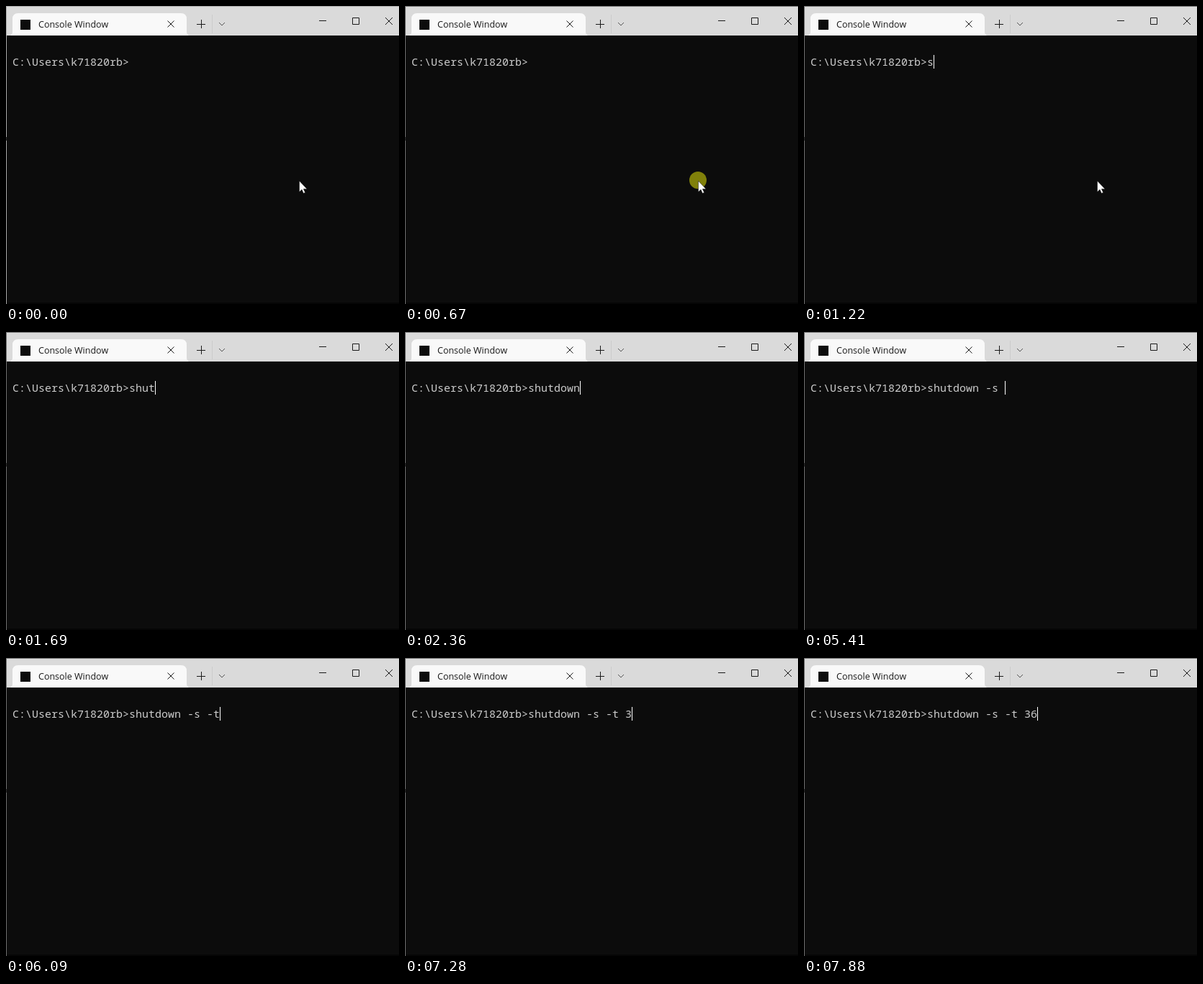
Write an HTML page that moves like this. It is 546 px wide and 414 px high and loops after 8 s.

```html
<!DOCTYPE html>
<html lang="en">
<head>
<meta charset="utf-8">
<title>Terminal typing</title>
<style>
  html, body { margin: 0; width: 100%; height: 100%; overflow: hidden; background: #0c0c0c; }
  svg { display: block; width: 546px; height: 414px; }
  .title { font: 500 12.5px "Open Sans", "Noto Sans", sans-serif; fill: #1a1a1a; }
  .term { font: 500 15px "Noto Sans Mono", "DejaVu Sans Mono", monospace; fill: #ccc; white-space: pre; font-variant-ligatures: none; }
  .line { fill: none; stroke: #1a1a1a; stroke-width: 1; }
</style>
</head>
<body>
<svg viewBox="0 0 546 414">
  <rect width="546" height="414" fill="#0c0c0c"/>
  <rect y="412" width="546" height="2" fill="#060606"/>
  <rect width="546" height="41" fill="#dadada"/>
  <path d="M4 41Q9 41 9 36V18Q9 10 17 10H243Q251 10 251 18V36Q251 41 256 41Z" fill="#f9f9f9"/>
  <rect x="20" y="19" width="14" height="14" fill="#0c0c0c"/>
  <text class="title" x="45" y="30">Console Window</text>

  <path class="line" d="M224.5 20.5l9 9m0-9l-9 9"/>
  <path class="line" d="M265 25.5h12M271.5 19v12"/>
  <path d="M286.5 12v26" stroke="#cbcbcb"/>
  <path class="line" d="M296 23l4 4 4-4" style="stroke:#555"/>
  <path class="line" d="M435 20.5h10M481.5 16.5h9v9h-9zM527 16l10 10m0-10l-10 10"/>

  <path id="edge" d="M0 .5H546M.5 0V414" fill="none"/>
  <rect y="182" width="1" height="5" fill="#2a2a2a"/>

  <text class="term" x="9" y="83" xml:space="preserve">C:\Users\k71820rb&gt;<tspan id="typed"></tspan></text>
  <rect id="caret" y="68" width="1" height="19" fill="#fff"/>
  <circle id="click" cx="407" cy="242" r="12" fill="#80800a"/>
  <path id="mouse" d="M407.5 243v15.3l3.5-3.3 2.3 5.2 2.4-1-2.3-5h4.8z" fill="#fff" stroke="#0c0c0c" stroke-width=".5"/>
</svg>
<script>
const LOOP = 8000, CELL = 9, START = 171;
const COMMAND = "shutdown -s -t 36";
// Time at which each character of the command is typed
const KEYS = [1220, 1490, 1590, 1690, 1970, 2100, 2230, 2360, 3200,
              4350, 4880, 5410, 5890, 6090, 6620, 7280, 7880];
// Spans in which the caret is lit
const LIT = [[730, 2960], [3480, 4080], [4350, LOOP]];

const $ = id => document.getElementById(id);
const typed = $("typed"), caret = $("caret"), click = $("click"),
      mouse = $("mouse"), edge = $("edge");
const within = (t, [from, to]) => t >= from && t < to;
const show = (el, on) => el.setAttribute("visibility", on ? "visible" : "hidden");

function draw(t) {
  const count = KEYS.filter(k => k <= t).length;
  typed.textContent = COMMAND.slice(0, count);
  caret.setAttribute("x", START + count * CELL);
  show(caret, LIT.some(span => within(t, span)));
  show(click, within(t, [670, 730]));
  show(mouse, t < 1290);
  edge.setAttribute("stroke", t < 670 ? "#a8a8a8" : "#6e6e6e");
}

const begin = performance.now();
function tick() {
  draw((performance.now() - begin) % LOOP);
  requestAnimationFrame(tick);
}
tick();
</script>
</body>
</html>
```
